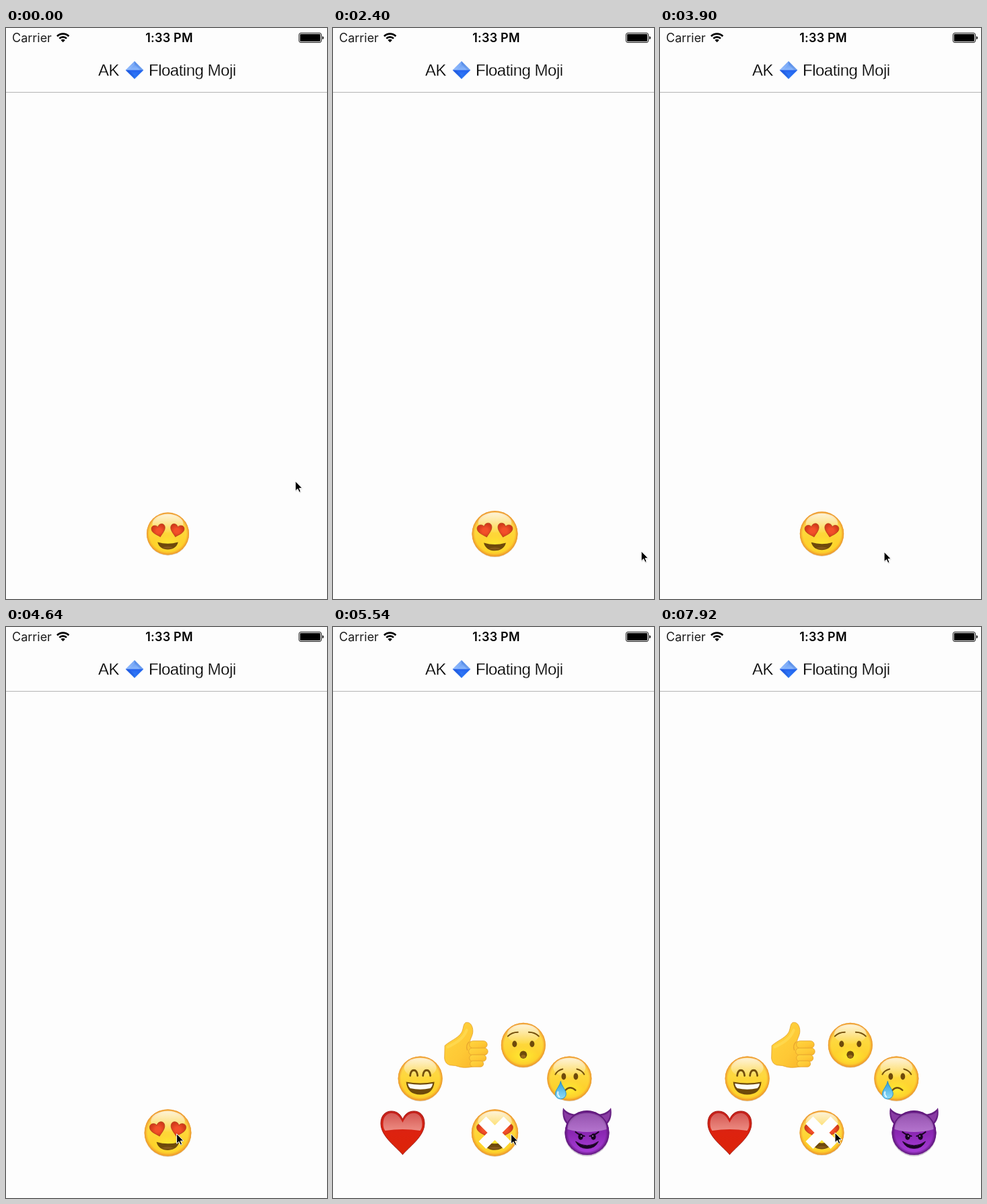
An HTML page that plays this animation: 477 px wide and 848 px high, repeating every 8 s.

```html
<!DOCTYPE html>
<html lang="en">
<head>
<meta charset="utf-8">
<title>Floating Moji</title>
<style>
  html, body { margin: 0; width: 100%; height: 100%; overflow: hidden; background: #fdfdfd; }
  svg { display: block; width: 100vw; height: 100vh; }
  .status { font: 18px Inter, sans-serif; }
  .bold { font-weight: 600; letter-spacing: .2px; }
  .title { font: 24px "Liberation Sans", Arial, sans-serif; letter-spacing: -.5px; stroke: #fdfdfd; stroke-width: .35px; }
  .ink { fill: none; stroke: #74500d; stroke-linecap: round; }
  .dark { fill: #6e4a0b; }
</style>
</head>
<body>
<svg viewBox="0 0 477 848">
  <defs>
    <linearGradient id="skin" x2="0" y2="1">
      <stop offset="0" stop-color="#fbd262"/>
      <stop offset=".45" stop-color="#fed83c"/>
      <stop offset=".75" stop-color="#fed02a"/>
      <stop offset="1" stop-color="#fbc52b"/>
    </linearGradient>
    <radialGradient id="rim">
      <stop offset=".86" stop-color="#f3a02b" stop-opacity="0"/>
      <stop offset="1" stop-color="#ea9130"/>
    </radialGradient>
    <linearGradient id="shine" x2="0" y2="1">
      <stop offset="0" stop-color="#fff" stop-opacity=".75"/>
      <stop offset="1" stop-color="#fff" stop-opacity=".04"/>
    </linearGradient>
    <linearGradient id="gloss" x2="0" y2="1">
      <stop offset="0" stop-color="#fff" stop-opacity=".25"/>
      <stop offset="1" stop-color="#fff" stop-opacity=".48"/>
    </linearGradient>
    <radialGradient id="glow">
      <stop offset="0" stop-color="#fff034" stop-opacity=".85"/>
      <stop offset="1" stop-color="#fff034" stop-opacity="0"/>
    </radialGradient>
    <linearGradient id="red" x2="0" y2="1">
      <stop offset="0" stop-color="#c2201c"/>
      <stop offset=".5" stop-color="#dd220f"/>
      <stop offset="1" stop-color="#dc2408"/>
    </linearGradient>
    <radialGradient id="eyeRed">
      <stop offset=".35" stop-color="#f3502a"/>
      <stop offset="1" stop-color="#d23a1a"/>
    </radialGradient>
    <linearGradient id="purple" x2="0" y2="1">
      <stop offset="0" stop-color="#7a2c98"/>
      <stop offset=".5" stop-color="#8a26b2"/>
      <stop offset="1" stop-color="#ab40dc"/>
    </linearGradient>
    <radialGradient id="purpleRim">
      <stop offset=".84" stop-color="#5b1676" stop-opacity="0"/>
      <stop offset="1" stop-color="#5b1676"/>
    </radialGradient>
    <linearGradient id="hand" x2="1" y2="1">
      <stop offset="0" stop-color="#ffd640"/>
      <stop offset=".6" stop-color="#fec835"/>
      <stop offset="1" stop-color="#f9b42a"/>
    </linearGradient>
    <linearGradient id="drop" x2="0" y2="1">
      <stop offset="0" stop-color="#2f9bd8"/>
      <stop offset="1" stop-color="#8fdcf8"/>
    </linearGradient>
    <linearGradient id="gem" x2="0" y2="1">
      <stop offset="0" stop-color="#5a92f0"/>
      <stop offset=".48" stop-color="#8ab6fb"/>
      <stop offset=".52" stop-color="#2463ee"/>
      <stop offset="1" stop-color="#3b8cff"/>
    </linearGradient>
    <path id="heart" d="M0 32.5C-9 21-32.500 6-32.500-14C-32.500-26-25-32-17-32C-8-32-3-27 0-20C3-27 8-32 17-32C25-32 32.500-26 32.500-14C32.500 6 9 21 0 32.500Z"/>
    <g id="ball">
      <circle cy="1" r="33" fill="#b9a58e" opacity=".45"/>
      <circle r="33" fill="url(#skin)"/>
      <ellipse cy="17" rx="23" ry="14" fill="url(#glow)"/>
      <circle r="33" fill="url(#rim)"/>
      <ellipse cy="-16" rx="24" ry="14.500" fill="url(#shine)"/>
    </g>
    <g id="eyeHeart"><use href="#heart" transform="scale(.33 .3)" fill="url(#eyeRed)" stroke="#a83a16" stroke-width="2"/></g>
    <g id="horn">
      <path d="M-35.500-37C-38-25-34-13-25-10L-12-27C-22-27-31-30-35.500-37Z" fill="#672083"/>
      <path d="M-34-32C-35-24-31-16-26-14L-20-25C-26-26-31-28-34-32Z" fill="#8a3ba4"/>
    </g>
    <g id="evilEye">
      <path d="M-17-1Q-11 4-4 5" fill="none" stroke="#1c0524" stroke-width="2.200" stroke-linecap="round"/>
      <ellipse cx="-9.500" cy="6" rx="3.700" ry="4.700" fill="#170320"/>
      <circle cx="-8.500" cy="5" r="1" fill="#b68ac6"/>
    </g>
  </defs>

  <rect width="477" height="848" fill="#fdfdfd"/>
  <rect y="95" width="477" height="1" fill="#b4b4b4"/>

  <text class="status" x="9" y="21" fill="#1c1c1c">Carrier</text>
  <text class="status bold" x="242.500" y="21" text-anchor="middle">1:33 PM</text>
  <g fill="none" stroke="#050505" stroke-width="2.700">
    <path d="M76 12.300A12.300 12.300 0 0 1 93.400 12.300"/>
    <path d="M79.300 15.600A7.600 7.600 0 0 1 90.100 15.600"/>
    <path d="M84.700 21.300L81.500 18A4.600 4.600 0 0 1 87.900 18Z" fill="#050505" stroke="none"/>
  </g>
  <rect x="435.500" y="7.500" width="33" height="14" rx="2.500" fill="none" stroke="#111"/>
  <rect x="437" y="9" width="30" height="11" rx="1"/>
  <path d="M470 12Q472 12.500 472 14.500T470 17Z"/>

  <text class="title" x="137" y="71">AK</text>
  <text class="title" x="212" y="71">Floating Moji</text>
  <g transform="translate(191 62.500)">
    <path d="M0-13.300L13.300 0L0 13.300L-13.300 0Z" fill="url(#gem)"/>
    <path d="M-13.300 0L0-13.300L0-8.500L-8.500 0Z" fill="#a5c8ff" opacity=".3"/>
    <path d="M-13.300 0H-8.500L0 8.500V13.300Z" fill="#174bd0" opacity=".4"/>
    <path d="M13.300 0H8.500L0 8.500V13.300Z" fill="#1e63ee" opacity=".4"/>
    <path d="M13.300 0H8.500L0-8.500V-13.300Z" fill="#4377d8" opacity=".35"/>
  </g>

  <g id="ring">
    <g>
      <use href="#heart" y="1" fill="#a99" opacity=".45"/>
      <use href="#heart" fill="url(#red)" stroke="#aa1d16" stroke-width="1"/>
      <path d="M-29-13C-29-24-23-29-17-29C-8-29-4-23 0-15C4-23 8-29 17-29C23-29 29-24 29-13Q29-7 26-3Q0-7-26-3Q-29-7-29-13Z" fill="url(#gloss)"/>
    </g>
    <g>
      <use href="#ball"/>
      <path class="ink" stroke-width="2.800" d="M-15-4C-14-15-5-15-4-4M4-4C5-15 14-15 15-4"/>
      <path class="dark" d="M-21 5Q0 9 21 5C20 18 12 24 0 24S-20 18-21 5Z"/>
      <path d="M-18.500 7.500Q0 11 18.500 7.500Q18 12 15 14.500Q0 18-15 14.500Q-18 12-18.500 7.500Z" fill="#fffdf5"/>
    </g>
    <g stroke="#e3a02c" stroke-width=".8" stroke-linejoin="round" transform="translate(-.5 0)">
      <path d="M-31.500 1C-24-6-12-10-7-18C-3-24-5-33 1-33.500C8-34 11-25 10-18C9-12 6-9 6-5L20-3L18 30Q4 35-8 33Q-16 30-24 30Q-31 28-32 20Z" fill="url(#hand)"/>
      <path d="M-27 3C-15-3-4-9 1-22" fill="none" stroke="#ffe05a" stroke-width="4" stroke-linecap="round" opacity=".6"/>
      <g fill="url(#hand)">
        <rect x="5" y="-6" width="26.500" height="11" rx="5.500"/>
        <rect x="4" y="4.500" width="28.500" height="10.500" rx="5.200"/>
        <rect x="5" y="14.500" width="25" height="10" rx="5"/>
        <rect x="6" y="23.500" width="20" height="9" rx="4.500"/>
      </g>
      <path d="M5-5Q-1 0 2 8" fill="none" stroke="#e7a42f" stroke-width="1.300"/>
    </g>
    <g>
      <use href="#ball"/>
      <path class="ink" stroke-width="1.900" d="M-23-13Q-17-19-8-19M23-13Q17-19 8-19"/>
      <ellipse class="dark" cx="-13" cy="-1.500" rx="3.500" ry="4.700"/>
      <ellipse class="dark" cx="13" cy="-1.500" rx="3.500" ry="4.700"/>
      <ellipse class="dark" cy="14.500" rx="5.400" ry="5.800"/>
      <ellipse cy="17" rx="3.500" ry="2.500" fill="#98691a"/>
    </g>
    <g>
      <use href="#ball"/>
      <path class="ink" stroke-width="1.900" d="M-21-6Q-18-12-10-14M22-6Q19-12 11-14"/>
      <ellipse class="dark" cx="-8.500" cy="-3" rx="3.400" ry="5"/>
      <ellipse class="dark" cx="9.500" cy="-3" rx="3.400" ry="5"/>
      <path class="ink" stroke-width="2.400" d="M-6 17.500Q1 10 9 17.500"/>
      <path d="M-13 4C-12 11-5 17-5 23A8 7.500 0 0 1-21 23C-21 17-14 11-13 4Z" fill="url(#drop)" stroke="#268fc8"/>
      <path d="M-17 20Q-18 25-15 27" fill="none" stroke="#e4f8ff" stroke-width="2" stroke-linecap="round"/>
    </g>
    <g>
      <circle cy="2" r="33" fill="#998ca0" opacity=".5"/>
      <use href="#horn"/><use href="#horn" transform="scale(-1 1)"/>
      <circle r="33" fill="url(#purple)"/>
      <circle r="33" fill="url(#purpleRim)"/>
      <path d="M-29-5C-29-22-15-29 0-29S29-22 29-5Q0 3-29-5Z" fill="url(#gloss)" opacity=".75"/>
      <use href="#evilEye"/><use href="#evilEye" transform="scale(-1 1)"/>
      <path d="M-17 13Q0 25 17 13Q12 23.500 0 23.500T-17 13Z" fill="#1b0524" stroke="#1b0524" stroke-width=".8" stroke-linejoin="round"/>
    </g>
  </g>

  <g id="face">
    <use href="#ball"/>
    <use href="#eyeHeart" transform="translate(-14 -4.500) rotate(-14)"/>
    <use href="#eyeHeart" transform="translate(14 -4.500) rotate(14)"/>
    <path class="dark" d="M-16 13Q0 18 16 13C14 21 8 24.500 0 24.500S-14 21-16 13Z"/>
    <path d="M-9 21.500Q0 18 9 21.500Q0 25-9 21.500Z" fill="#85591a"/>
  </g>
  <path id="cross" transform="translate(240.500 751)" d="M-18.500-18.500L18.500 18.500M18.500-18.500L-18.500 18.500" stroke="#fefefe" stroke-width="15.500"/>
  <g id="cursor">
    <path d="M0 0V14.500L3.400 11.500L5.700 16.500L8 15.500L5.800 10.500H10.200Z" fill="#777" opacity=".3" transform="translate(.6 1.300)"/>
    <path d="M0 0V14.500L3.400 11.500L5.700 16.500L8 15.500L5.800 10.500H10.200Z" stroke="#fff" stroke-width="1"/>
  </g>
</svg>
<script>
  const LOOP = 8000, TICK = 149.4, TAP = 4690;
  const CX = 240.5, CY = 751, RADIUS = 137;
  const byId = id => document.getElementById(id);
  const ring = byId("ring"), face = byId("face"), cross = byId("cross"), cursor = byId("cursor");
  const buttons = [...ring.children].map(el => {
    const holder = document.createElementNS("http://www.w3.org/2000/svg", "g");
    el.replaceWith(holder);
    holder.append(el);
    return holder;
  });

  // time, x, y of the pointer tip; it is off stage between the two paths
  const leave = [[0, 430, 673], [300, 431, 675], [1050, 455, 715]];
  const enter = [[1800, 466, 768], [2100, 461, 775], [2400, 458, 777], [3250, 458, 777],
    [3900, 330, 778], [4340, 275, 776], [4640, 253, 752], [4940, 253, 751],
    [5400, 264, 753], [5600, 265, 753], [6300, 260, 751]];

  function along(path, t) {
    const i = path.findIndex(p => p[0] > t);
    if (i < 0) return path[path.length - 1].slice(1);
    const [t0, x0, y0] = path[i - 1], [t1, x1, y1] = path[i];
    const u = (t - t0) / (t1 - t0);
    return [x0 + (x1 - x0) * u, y0 + (y1 - y0) * u];
  }

  function spring(s) {
    if (s <= 0) return 0;
    const w = 15, z = .8, d = Math.sqrt(1 - z * z);
    return 1 - Math.exp(-z * w * s) * (Math.cos(w * d * s) + z / d * Math.sin(w * d * s));
  }

  function draw(time) {
    const t = Math.floor(time / TICK) * TICK;
    const since = (t - TAP) / 1000;
    const open = spring(since);
    const pop = since > 0 && since < .5 ? .18 * Math.sin(Math.PI * since / .5) : 0;
    const r = (33.2 + 1.7 * Math.cos(2 * Math.PI * (t - 535) / 1015)) * (1 + pop);
    face.setAttribute("transform", `translate(${CX} ${CY}) scale(${r / 33})`);

    buttons.forEach((b, i) => {
      const a = Math.PI * (1 - i / 5);
      const x = CX + RADIUS * open * Math.cos(a), y = CY - RADIUS * open * Math.sin(a);
      b.setAttribute("transform", `translate(${x} ${y})`);
    });
    const alpha = Math.min(1, open * 1.1);
    ring.setAttribute("opacity", alpha);
    cross.setAttribute("opacity", alpha);

    const gone = t > 1100 && t < 1800;
    cursor.setAttribute("visibility", gone ? "hidden" : "visible");
    if (!gone) cursor.setAttribute("transform", `translate(${along(t < 1100 ? leave : enter, t)})`);
  }

  const start = performance.now();
  function frame() {
    draw((performance.now() - start) % LOOP);
    requestAnimationFrame(frame);
  }
  frame();
</script>
</body>
</html>
```
